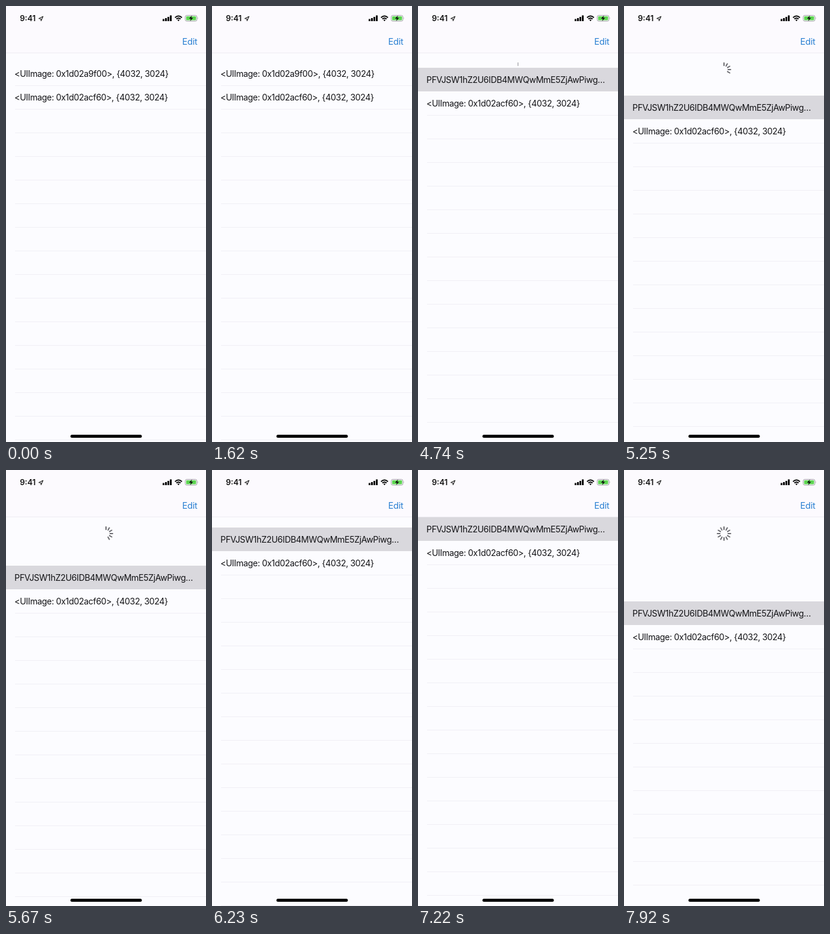
These frames come from a looping animation (332x720 px, 8000 ms). An HTML page:

```html
<!DOCTYPE html>
<html lang="en">
<head>
<meta charset="utf-8">
<title>Pull to refresh</title>
<style>
  html, body { margin: 0; width: 100%; height: 100%; overflow: hidden; background: #fcfcff; }
  svg { display: block; width: 332px; height: 720px; font-family: Inter, "Open Sans", sans-serif; }
  .row { font-size: 14.15px; letter-spacing: -0.38px; fill: #131316; }
</style>
</head>
<body>
<svg viewBox="0 0 332 720">
  <rect width="332" height="720" fill="#fcfcff"/>
  <g id="lines" fill="#f0eff5"></g>
  <g id="spinner" stroke="#6d6d72" stroke-width="2" stroke-linecap="round"></g>

  <g id="rows">
    <rect id="highlight" width="332" height="39" fill="#d9d8dd"/>
    <text id="first" class="row" x="14" y="25"></text>
    <text class="row" x="14" y="64">&lt;UIImage: 0x1d02acf60&gt;, {4032, 3024}</text>
  </g>

  <rect width="332" height="77" fill="#fcfafe"/>
  <rect y="77" width="332" height="1" fill="#eeedf3"/>
  <text x="317.5" y="64" text-anchor="end" font-size="14.7" letter-spacing="-0.3" fill="#2b80d2">Edit</text>

  <!-- status bar -->
  <text x="23" y="25" font-size="13" font-weight="600" fill="#111">9:41</text>
  <path d="M54.5 20.7L61.5 17.2L58.2 24.4L57.8 21.2Z" fill="none" stroke="#222" stroke-width="1.1" stroke-linejoin="round"/>
  <path d="M260 21.5h3v3.5h-3zM264 20h3v5h-3zM268 18h3v7h-3zM272 15.5h3v9.5h-3z" fill="#050505"/>
  <g fill="none" stroke="#050505" stroke-width="2">
    <path d="M280.6 19.2Q286.3 13.8 292 19.2M282.8 21.6Q286.3 18.3 289.8 21.6"/>
    <path d="M284.5 23L286.3 25.2L288.1 23Q286.3 21.6 284.5 23Z" fill="#050505" stroke="none"/>
  </g>
  <rect x="297.5" y="15.5" width="19.5" height="9.5" rx="2.6" fill="#fcfcff" stroke="#a0a0a4"/>
  <rect x="299" y="17" width="16.5" height="6.5" rx="1.3" fill="#5fd653"/>
  <path d="M318.3 18.6q1.4 1.6 0 3.2z" fill="#a0a0a4"/>
  <path d="M308.6 15.6L303.8 21H306.8L305.7 25L310.7 19.5H307.6Z" fill="#111"/>

  <rect x="107" y="708" width="118.5" height="5" rx="2.5"/>
</svg>
<script>
const LOOP = 8000, TOP = 78, ROW = 39, SELECT_AT = 3450, RELEASE_AT = 5950;
const PLAIN = "<UIImage: 0x1d02a9f00>, {4032, 3024}";
const ENCODED = "PFVJSW1hZ2U6IDB4MWQwMmE5ZjAwPiwg…";

const $ = id => document.getElementById(id);
const clamp = v => Math.max(0, Math.min(1, v));
const easeOut = p => 1 - (1 - p) ** 2;

function addAll(parent, count, tag, attrs) {
  return Array.from({ length: count }, (_, i) => {
    const el = document.createElementNS("http://www.w3.org/2000/svg", tag);
    for (const [key, value] of Object.entries(attrs(i))) el.setAttribute(key, value);
    return parent.appendChild(el);
  });
}

addAll($("lines"), 17, "rect", i => ({ x: 15, y: ROW * (i + 1), width: 317, height: 1 }));
const ticks = addAll($("spinner"), 12, "line", i => ({
  x1: 0, x2: 0, y1: -6.8, y2: -11, transform: `translate(166 105) rotate(${i * 30})`
}));

function pullAt(t) {
  const move = (t0, t1, from, to, ease = p => p) =>
    from + (to - from) * ease(clamp((t - t0) / (t1 - t0)));
  if (t < 4740) return move(4600, 4740, 14, 24, p => p * p);
  if (t < 5120) return move(4740, 5120, 24, 62);
  if (t < RELEASE_AT) return move(5120, 5670, 62, 80, easeOut);
  if (t < 7230) {
    const x = 10.4 * (t - RELEASE_AT) / 1000;
    return 80 * (1 + x) * Math.exp(-x);
  }
  if (t < 7740) return move(7230, 7740, 0, 135, p => p * p * (3 - 2 * p));
  return move(7740, 7920, 135, 139, easeOut);
}

function draw(t) {
  const pull = Math.round(pullAt(t));
  const selected = t >= SELECT_AT;
  for (const id of ["rows", "lines"]) $(id).setAttribute("transform", `translate(0 ${TOP + pull})`);
  $("highlight").setAttribute("visibility", selected ? "visible" : "hidden");
  $("first").textContent = selected ? ENCODED : PLAIN;
  $("lines").firstChild.setAttribute("visibility", selected ? "hidden" : "visible");
  ticks.forEach((tick, i) => tick.setAttribute("opacity", clamp((pull - 20) / 10 - i)));
}

const start = performance.now();
function frame() {
  draw((performance.now() - start) % LOOP);
  requestAnimationFrame(frame);
}
frame();
</script>
</body>
</html>
```
